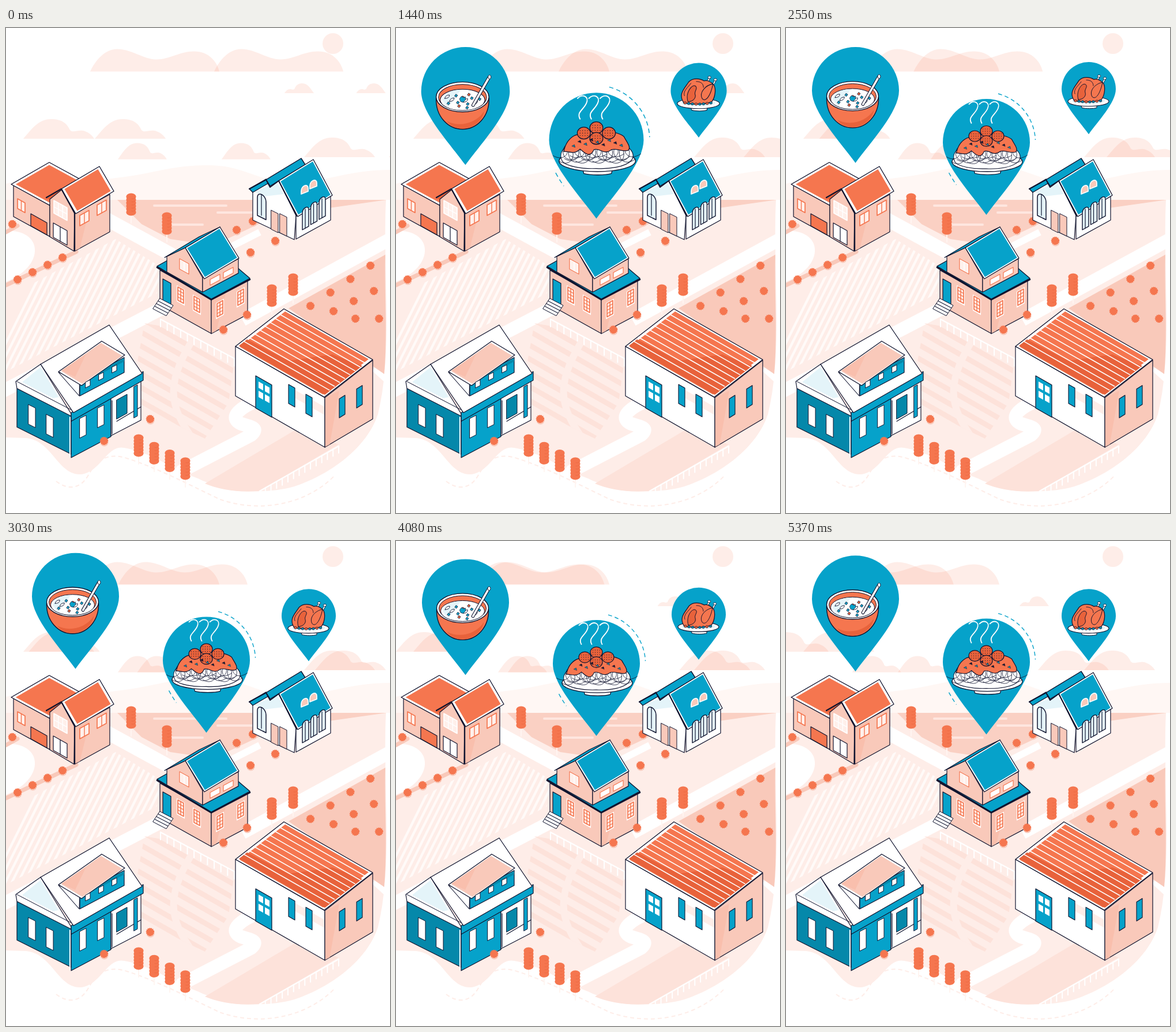
Recreate the animation shown at these times as an HTML page. Size 666 by 841 pixels, loop 5.4 s.

```html
<!DOCTYPE html>
<html lang="en">
<head>
<meta charset="utf-8">
<title>Village meals</title>
<style>
  html, body { margin: 0; width: 100%; height: 100%; overflow: hidden; background: #fff; }
  svg { display: block; width: 666px; height: 841px; }
</style>
</head>
<body>
<svg id="stage" viewBox="0 0 666 841" xmlns="http://www.w3.org/2000/svg"></svg>
<script>
const ORANGE = '#f5764f', RUST = '#e8623b', PEACH = '#f9c9ba', SHADE = '#f9bfad', PALE = '#fff0eb';
const BLUSH = '#feede8', ROW = '#fde2da', TEAL = '#06a2ca', DEEP = '#0588aa', ICE = '#e4f4f9';
const NAVY = '#10142f', WHITE = '#fff';
const LOOP = 5400, STEP = 30;

// Basic marks: a positive width adds an outline.
const shape = (d, fill = 'none', width = 0, color = NAVY) =>
  `<path d="${d}" fill="${fill}"${width ? ` stroke="${color}" stroke-width="${width}" stroke-linejoin="round" stroke-linecap="round"` : ''}/>`;
const line = (d, width = 1.2, color = NAVY) => shape(d, 'none', width, color);
const band = (d, width, color) => `<path d="${d}" fill="none" stroke="${color}" stroke-width="${width}"/>`;
const dashed = (d, width, color) =>
  `<path d="${d}" fill="none" stroke="${color}" stroke-width="${width}" stroke-dasharray="7 5"/>`;
const oval = (x, y, rx, ry, fill, width = 0) =>
  `<ellipse cx="${x}" cy="${y}" rx="${rx}" ry="${ry}" fill="${fill}"${width ? ` stroke="${NAVY}" stroke-width="${width}"` : ''}/>`;
const many = (count, draw) => Array.from({ length: count }, (_, i) => draw(i)).join('');
const row = (count, x, y, dx, dy, draw) => many(count, i => draw(x + dx * i, y + dy * i));
const clipped = (id, d, content) => `<clipPath id="${id}"><path d="${d}"/></clipPath><g clip-path="url(#${id})">${content}</g>`;

// Isometric parts.
const quad = (x, y, ux, uy, vx, vy, fill, width = 0) =>
  shape(`M${x} ${y}l${ux} ${uy}l${vx} ${vy}l${-ux} ${-uy}z`, fill, width);
const panel = (x, y, w, h, slope, fill, width = 0, color = NAVY) =>
  shape(`M${x} ${y}l${w} ${w * slope}v${h}l${-w} ${-w * slope}z`, fill, width, color);
const wall = (x, y, w, h, slope, fill) => panel(x, y, w, h, slope, fill, 1.2);
const wedge = (x, y, w, h) => shape(`M${x + 1} ${y + 1}l${w} ${-w * .55}L${x + w * .35} ${y + h - 5}L${x + 1} ${y + h - 1}z`, SHADE);
function roof(x, y, ux, uy, vx, vy, fill, rim = .06) {
  const keep = 1 - 2 * rim;
  return quad(x, y, ux, uy, vx, vy, WHITE, 1.3) +
    quad(x + (ux + vx) * rim, y + (uy + vy) * rim, ux * keep, uy * keep, vx * keep, vy * keep, fill);
}
const sash = (x, y, w, h, slope, cols, rows, fill, frame) =>
  panel(x, y, w, h, slope, fill, 1.7, frame) +
  many(cols - 1, i => { const dx = w * (i + 1) / cols; return line(`M${x + dx} ${y + dx * slope}v${h}`, 1.4, frame); }) +
  many(rows - 1, i => line(`M${x} ${y + h * (i + 1) / rows}l${w} ${w * slope}`, 1.4, frame));
const arch = (x, y, w, h, slope, fill, width, color) =>
  shape(`M${x} ${y}c0 ${-w * .8} ${w} ${w * (slope - .8)} ${w} ${w * slope}v${h}l${-w} ${-w * slope}z`, fill, width, color);

const bush = (x, y) => oval(x + .5, y + 2.5, 7, 7, PEACH) +
  `<circle cx="${x}" cy="${y}" r="6.4" fill="${ORANGE}" stroke="${ORANGE}" stroke-width="2" stroke-dasharray="0 2.87" stroke-linecap="round"/>`;
const tree = (x, y) => line(`M${x} ${y + 32}v20`, 2, '#fff5f1') +
  row(6, x, y + 6.5, 0, 5.4, (cx, cy) => oval(cx, cy, 8.6, 6, ORANGE)) +
  row(5, x + 1, y + 10, 0, 5.4, (cx, cy) => line(`M${cx} ${cy}q3 1 5 -1`, .6, RUST));
const fence = (x, y, dx, dy, gaps, height) =>
  line(`M${x} ${y}l${dx} ${dy}`, 2.4, WHITE) +
  row(gaps + 1, x, y, dx / gaps, dy / gaps, (px, py) => line(`M${px} ${py}v${height}`, 2, WHITE));

const ground = () =>
  shape('M0 270C70 252 120 272 190 260 250 254 285 238 350 238 402 238 420 255 470 266 530 278 580 246 666 246V298H0z', '#fff7f4') +
  shape('M0 298H659C653 420 672 560 645 670 625 730 560 775 500 795 440 812 370 800 335 782 290 765 250 735 205 728 175 722 165 770 130 774 90 776 80 715 35 711L0 710z', BLUSH) +
  shape('M193 298H660L470 325 385 365 340 374 285 366 235 340z', '#fad0c3') +
  line('M257 308H382M367 320H440M285 341H341', 4, '#fee6df') +
  shape('M0 352C34 350 52 368 50 388 48 412 25 430 0 440z', WHITE) +
  line('M0 446L122 388M0 354L20 343', 7, PEACH) +
  band('M-10 632L275 484M410 506L670 364', 23, WHITE) +
  band('M168 328L300 400', 24, WHITE) +
  band('M385 382L440 354', 12, WHITE) + band('M640 588L664 610', 16, WHITE) +
  clipped('meadow', 'M190 366L268 414 262 460 0 596V468z',
    row(34, -30, 366, 11, 0, (x, y) => line(`M${x + 120} ${y}l-120 240`, 4.2, '#fffaf8'))) +
  clipped('crops', 'M240 512L300 522 395 584 386 650 345 712 215 650z',
    row(13, 200, 460, 0, 24, (x, y) => band(`M${x} ${y}l200 114`, 9, ROW)) +
    band('M330 530C280 610 275 650 330 720', 12, BLUSH)) +
  shape('M345 790L500 698 577 722 440 803C400 806 370 800 345 790z', ROW) +
  line('M305 768L425 706C440 693 425 692 407 686 390 678 394 662 445 642', 23, WHITE) +
  shape('M490 486L658 393C656 450 662 530 656 600z', PEACH) +
  fence(268, 505, 128, 68, 11, 13) + fence(440, 803, 137, -78, 14, 12) +
  dashed('M87 786C105 800 128 802 143 775 160 745 180 735 215 748 265 764 330 798 370 817 440 842 520 826 568 778', 2, BLUSH);

const planting = () =>
  row(2, 217, 286, 62, 33, tree) + row(2, 461, 444, 37, -19, tree) + row(4, 230, 704, 27, 13.3, tree) +
  bush(11, 340) + row(4, 20, 436, 26, -12.7, bush) + row(2, 400, 350, 28, -15, bush) + row(2, 424, 389, 43, -20, bush) +
  row(4, 632, 412, -34.7, 23.3, bush) + row(3, 638, 456, -35, 17.5, bush) + row(2, 606, 504, 41, 0, bush);
const frontPlanting = () => row(2, 418, 497, -41, 26, bush) + row(2, 250, 678, -80, 38, bush);

const redHouse = () =>
  wall(13, 273, 63, 54, .55, PEACH) +
  roof(9, 271, 66, -38, 66, 36, ORANGE) + quad(70, 296, 44, -29, 16, 3, RUST) +
  shape('M76 297L97 280 119 321 118 387 76 362z', PEACH, 1.2) +
  wall(119, 322, 61, 65, -.55, PEACH) + wedge(119, 322, 26, 65) +
  roof(96, 279, 66, -39, 25, 43, ORANGE) +
  line('M70 294L96 279 119 321V386', 2.3) +
  sash(20, 296, 13, 17, .55, 2, 1, PALE, ORANGE) +
  wall(43, 322, 28, 21, .56, ORANGE) +
  sash(83, 299, 23, 22, .55, 3, 2, PALE, WHITE) +
  wall(82, 338, 24, 25, .56, WHITE) + line('M94 345v25') +
  row(2, 128, 325, 30, -18, (x, y) => sash(x, y, 16, 18, -.55, 2, 1, PALE, ORANGE));

const chapel = () =>
  shape('M428 281L452 267 474 265 503 325 500 367 428 333z', WHITE, 1.2) +
  shape('M430 284L470 268 482 288 448 292z', ICE) +
  wall(503, 325, 60, 41, -.55, WHITE) +
  quad(422, 279, 29, -17, 6, 6, TEAL, 1.4) +
  quad(451, 263, 61, -37, 7, 11, TEAL, 1.4) +
  roof(473, 265, 60, -37, 33, 62, TEAL, .035) +
  line('M422 279L451 263 458 276 473 265 504 326', 2) +
  arch(436, 294, 15, 31, .5, ICE, 1.5) + line('M443 289v36') +
  row(2, 460, 316, 15, 6, (x, y) => panel(x, y, 12, 33, .5, PEACH, 1)) +
  row(3, 514, 321, 14.5, -9, (x, y) => arch(x, y, 11, 29, -.55, ICE, 1.4) + line(`M${x + 5} ${y - 7}v33`)) +
  row(2, 512, 283, 15, -9, (x, y) => arch(x, y, 12, 5, -.4, PEACH, 1.8, WHITE));

const cottage = () =>
  wall(267, 420, 89, 60, .56, PEACH) + wall(356, 470, 63, 60, -.53, PEACH) + wedge(356, 470, 25, 60) +
  shape('M262 413L280 403 341 440 403 417 423 434 356 470z', TEAL, 1.3) +
  line('M262 415L356 471 423 436', 2.8) +
  shape('M279 396L311 381 341 433V458L279 423z', PEACH, 1.2) +
  wall(341, 433, 62, 25, -.53, PEACH) +
  quad(275, 398, 36, -17, 60, -36, TEAL, 1.3) +
  roof(311, 381, 60, -36, 33, 54, TEAL, .035) +
  sash(302, 401, 14, 17, .55, 2, 1, PALE, WHITE) + panel(301, 400, 16, 18, .55, 'none', 1.2, ORANGE) +
  row(2, 354, 436, 23, -12, (x, y) => panel(x, y, 17, 10, -.53, WHITE, 1.2, ORANGE)) +
  wall(272, 435, 14, 41, .56, TEAL) +
  row(2, 296, 446, 28, 16, (x, y) => panel(x, y, 14, 28, .55, WHITE) + sash(x + 2, y + 3, 10, 23, .55, 2, 4, PALE, ORANGE)) +
  row(2, 364, 477, 36, -20, (x, y) => panel(x, y, 14, 28, -.55, WHITE) + sash(x + 2, y + 1, 10, 23, -.55, 2, 4, PALE, ORANGE)) +
  row(4, 267, 469, -3, 4.5, (x, y) => quad(x, y, 23, 12, -3, 4.5, WHITE, 1));

const manor = () =>
  wall(19, 625, 94, 67, .5, DEEP) + wall(113, 670, 69, 75, -.53, TEAL) + wall(182, 634, 52, 73, -.52, WHITE) +
  panel(192, 645, 18, 33, -.55, DEEP, 1) + line('M184 646V704M192 682L234 657') +
  panel(222, 622, 6, 54, -.55, TEAL, 1) +
  shape('M17 613L60 583 113 669V673L19 625z', WHITE, 1.2) +
  shape('M28 614L60 588 91 640 82 642z', ICE) + line('M19 613L113 662', 1) +
  wall(113, 667, 125, 15, -.57, TEAL) +
  quad(60, 583, 119, -68, 57, 84, WHITE, 1.3) +
  shape('M91 597L128 611 127 638z', WHITE, 1.1) +
  wall(128, 612, 77, 26, -.53, TEAL) + panel(128, 614, 77, 5, -.53, DEEP) +
  roof(91, 596, 75, -53, 40, 24, PEACH, .04) + shape('M96 594L139 565 120 605z', SHADE) +
  row(3, 138, 614, 23, -13, (x, y) => panel(x, y, 8, 10, -.5, WHITE, 1)) +
  row(2, 39, 653, 31, 17, (x, y) => panel(x, y, 12, 34, .5, WHITE, 1)) +
  row(2, 128, 677, 31, -18, (x, y) => panel(x, y, 11, 34, -.5, WHITE, 1)) +
  line('M111 675V742', 2, WHITE);

const barn = () =>
  wall(398, 552, 155, 86, .574, WHITE) + panel(500, 627, 52, 14, .574, BLUSH) +
  shape('M553 641L636 576V678L553 727z', PEACH, 1.2) + wedge(553, 641, 24, 86) +
  roof(482, 487, 154, 88, -84, 65, ORANGE, .03) +
  shape('M404 551L418 540 490 577 566 566 618 586 553 636z', RUST) +
  row(8, 474, 496, -8.9, 6.7, (x, y) => line(`M${x} ${y}l149 85`, 1.6, WHITE)) +
  wall(433, 603, 28, 56, .57, TEAL) +
  row(2, 438, 613, 0, 16, (x, y) => row(2, x, y, 11, 6, (px, py) => panel(px, py, 8, 11, .57, WHITE))) +
  row(2, 490, 618, 30, 17, (x, y) => panel(x, y, 11, 33, .57, TEAL, 1.1)) +
  row(2, 578, 643, 30, -17, (x, y) => panel(x, y, 10, 33, -.62, TEAL, 1.1));

// Clouds: each has a still copy and one that drifts left (px per second).
const RIDGE = 'M0 39C9 20 25 0 47 0 72 0 92 18 115 18 138 18 155 4 180 4 206 4 220 22 224 39z';
const PUFF = 'M0 34C14 18 26 0 48 0 68 0 76 8 81 19 86 25 96 17 107 21 115 24 120 29 123 34z';
const clouds = [
  { d: RIDGE, still: 146, start: 361, y: 36.5, speed: 54.8, sx: 1, sy: 1 },
  { d: PUFF, still: 534, start: 658.5, y: 96, speed: 37.7, sx: -.415, sy: .5 },
  { d: PUFF, still: 30, start: 154, y: 158, speed: 37.8, sx: 1, sy: 1 },
  { d: PUFF, still: 194, start: 374, y: 199.5, speed: 48.3, sx: .69, sy: .83 },
  { d: PUFF, still: 517, start: 664, y: 190, speed: 42.3, sx: 1, sy: 1 },
];
const place = (c, x) => `translate(${x.toFixed(2)} ${c.y}) scale(${c.sx} ${c.sy})`;

// Food is drawn relative to the tip of its pin.
const soup = () =>
  shape('M-50 -114C-51 -82 -29 -61 -5 -61 19 -61 41 -82 40 -114z', ORANGE, 1.4) +
  shape('M-32 -75C-12 -64 18 -70 32 -92 28 -72 10 -62 -6 -62 -16 -62 -26 -67 -32 -75z', RUST) +
  oval(-5, -116, 45, 25.5, WHITE, 1.4) + oval(-5, -115.5, 41, 22, ORANGE, 1) +
  oval(-5, -111, 38, 18, WHITE, 1) + shape('M-40 -111C-34 -125 -20 -128 -8 -128L-30 -98z', ICE) +
  many(14, i => {
    const angle = i * 2.4, reach = Math.sqrt((i + .5) / 15);
    const x = -6 + 32 * reach * Math.cos(angle), y = -110 + 14 * reach * Math.sin(angle);
    return i % 4 ? shape(`M${x - 2} ${y + 1}l2 -3 3 2 -2 3z`, i % 2 ? TEAL : RUST, .8)
      : shape(`M${x - 4} ${y + 3}q1 -6 8 -6q0 6 -8 6z`, WHITE, .9);
  }) +
  shape('M-10 -113l3 -4 4 2 3 -1 0 5 -4 4 -4 -1z', TEAL, .7) +
  line('M13 -102L40 -149', 5.6) + line('M13 -102L40 -149', 3.5, WHITE) + oval(41, -150, 2.5, 3.4, WHITE, .9);

const spaghetti = () =>
  shape('M-22 -80L-20 -72C-10 -69 15 -69 24 -72L26 -80z', WHITE, 1.2) +
  oval(1.5, -92, 61, 17, WHITE, 1.3) + oval(1.5, -94, 52, 12, ICE) +
  shape('M-54 -91C-64 -108 -46 -126 0 -128 48 -126 66 -106 56 -93 46 -82 20 -79 0 -80 -25 -79 -48 -84 -54 -91z', WHITE, 1.1) +
  many(12, i => {
    const x = -50 + i * 9, dip = 14 + 5 * Math.sin(i * 2.1);
    return line(`M${x} -116c-10 ${dip} 4 ${dip + 16} 22 ${dip + 3}M${-x} -114c9 ${dip} -4 ${dip + 14} -20 ${dip + 4}`, .8);
  }) +
  shape('M-52 -107C-50 -118 -44 -128 -34 -133 -10 -142 30 -142 44 -131 48 -123 56 -114 51 -109 42 -106 32 -113 24 -110 12 -100 5 -114 -4 -110 -10 -95 -20 -106 -26 -111 -36 -101 -44 -108 -52 -107z', ORANGE, 1.2) +
  many(4, i => {
    const angle = (i - 1) * Math.PI / 2, x = 20 * Math.cos(angle), y = -136.5 + 8.5 * Math.sin(angle);
    return oval(x, y, 10.5, 9.5, RUST, 1.2) +
      row(3, x, y - 4, 0, 4, (cx, cy) => row(4, cx - 6, cy, 4, 0, (px, py) => oval(px, py, .6, .6, NAVY)));
  }) +
  many(9, i => shape(`M${-39 + i * 9.5} ${-116 - i * 7 % 11}l4 -2 1 4z`, i % 2 ? NAVY : DEEP, .5)) +
  row(3, -30, -192, 18, 0, (x, y) => line(`M${x} ${y}c8 -8 19 -3 14 8s-16 14 -10 25`, 1.8, WHITE)) +
  dashed('M20.5 -210A87 87 0 0 1 85 -130M-65 -73Q-59 -62 -52 -52', 1.4, TEAL);

const roast = () =>
  shape('M-13 -51L-12 -46C-5 -44 8 -44 14 -46V-51z', WHITE, 1) +
  oval(-.5, -57, 35.5, 8.5, WHITE, 1.1) + oval(-.5, -58, 29, 5.5, ICE) +
  row(2, 15, -94, 10, 4, (x, y) => line(`M${x} ${y}l3 -6`, 3.2) + line(`M${x} ${y}l3 -6`, 1.8, WHITE) + oval(x + 3, y - 7, 2.6, 2, WHITE, .8)) +
  shape('M-25 -58C-35 -73 -24 -82 -17 -93 -10 -101 3 -99 9 -95 15 -97 20 -93 24 -90 30 -84 28 -68 22 -60 10 -55 -12 -55 -25 -58z', ORANGE, 1.2) +
  shape('M-18 -60C-23 -75 -11 -91 -5 -86 -1 -82 -8 -78 -6 -72 -4 -66 -10 -60 -18 -60z', RUST, 1) +
  shape('M24 -90C12 -88 0 -76 6 -65 12 -59 20 -70 24 -90z', ORANGE, 1) +
  line('M-24 -70C-27 -78 -18 -84 -13 -91M-4 -94C4 -94 8 -90 8 -84', .9) +
  many(8, i => oval(-23 + i * 6.2, -58 + 2 * Math.sin(i / 7 * Math.PI), 2.4, 2, i % 3 ? DEEP : RUST, .7));

const pins = [
  { x: 120.5, y: 224, size: 1, food: soup },
  { x: 347.5, y: 324, size: 1, food: spaghetti },
  { x: 525, y: 194.3, size: .6225, food: roast },
];
const PIN = 'M0 0C-26 -36 -75.5 -88 -75.5 -125.5A75.5 75.5 0 0 1 75.5 -125.5C75.5 -88 26 -36 0 0z';
const STAGGER = 150, FIRST_POP = 895, FIRST_LOW = 300, BOB = 1200, SWING = 14.3;

// Grow past full size, then settle back.
function popScale(age) {
  if (age <= 0) return 0;
  if (age < 325) return 1.1 * (1 - (1 - age / 325) ** 2);
  const u = Math.min(1, (age - 325) / 300);
  return 1.1 - .1 * u * u * (3 - 2 * u);
}

const stage = document.getElementById('stage');
stage.innerHTML =
  `<g fill="${ORANGE}" fill-opacity=".13"><circle cx="567" cy="27" r="18"/>` +
  clouds.map(c => `<path d="${c.d}" transform="${place(c, c.still)}"/><path class="drift" d="${c.d}"/>`).join('') + '</g>' +
  ground() + planting() + redHouse() + chapel() + cottage() + manor() + barn() + frontPlanting() +
  pins.map(p => `<g class="pin"><path d="${PIN}" fill="${TEAL}" transform="scale(${p.size})"/>${p.food()}</g>`).join('');
const drifts = stage.querySelectorAll('.drift'), pinNodes = stage.querySelectorAll('.pin');

function render(time) {
  const t = Math.floor((time % LOOP + 2) / STEP) * STEP % LOOP;
  clouds.forEach((c, i) => drifts[i].setAttribute('transform', place(c, c.start - c.speed * t / 1000)));
  pins.forEach((p, i) => {
    const delay = STAGGER * i;
    const y = p.y + SWING * Math.cos(2 * Math.PI * (t - FIRST_LOW - delay) / BOB);
    const scale = popScale(t - FIRST_POP - delay);
    pinNodes[i].setAttribute('display', scale ? 'inline' : 'none');
    pinNodes[i].setAttribute('transform', `translate(${p.x} ${y.toFixed(2)}) scale(${scale.toFixed(4)})`);
  });
}

const begin = performance.now();
function tick() {
  render(performance.now() - begin);
  requestAnimationFrame(tick);
}
tick();
</script>
</body>
</html>
```
